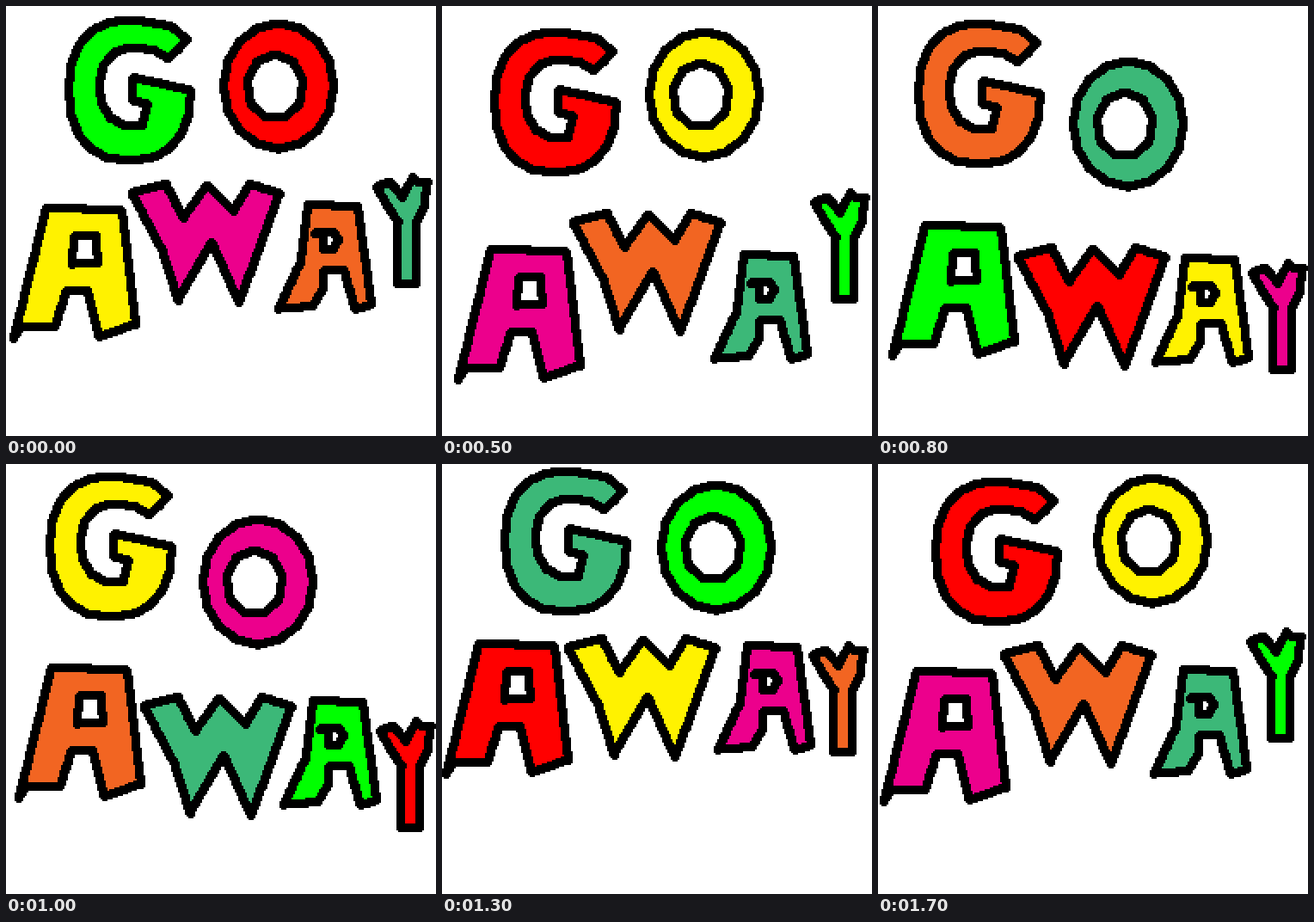
Write an HTML page with a canvas that moves like this. It is 500 px wide and 500 px high and loops after 1800 ms.

```html
<!DOCTYPE html>
<html lang="en">
<head>
<meta charset="utf-8">
<title>Go away</title>
<style>
html, body { margin: 0; width: 100%; height: 100%; overflow: hidden; background: #fff; }
canvas { display: block; width: 500px; height: 500px; image-rendering: pixelated; }
</style>
</head>
<body>
<canvas id="stage" width="250" height="250" role="img" aria-label="GO AWAY"></canvas>
<script>
const ctx = document.getElementById('stage').getContext('2d');
const STEP = 100, STEPS = 18;
const KEYS = [0, 3, 9, 13, 16, STEPS];
const COLORS = ['#00ff00', '#3cb878', '#f26522', '#ec008c', '#fff200', '#ff0000'];

// "x,y x,y ..." in stage pixels
const line = s => s.split(' ').map(p => p.split(',').map(Number));

// points along an ellipse, angles in degrees; square < 1 gives fuller corners
function arc(cx, cy, rx, ry, from, to, n, square = 1) {
  const bend = v => Math.sign(v) * Math.abs(v) ** square;
  return Array.from({ length: n + 1 }, (_, i) => {
    const a = (from + (to - from) * i / n) * Math.PI / 180;
    return [cx + rx * bend(Math.cos(a)), cy + ry * bend(Math.sin(a))];
  });
}
const ring = (cx, cy, rx, ry, n) => arc(cx, cy, rx, ry, -90, 270, n);

// every letter starts and ends at rest and passes through its poses at the keys
const letter = (poses, ...loops) => ({ poses: line(`0,0 ${poses} 0,0`), loops });

const letters = [
  letter('-2,20 -30,0 0,-8 -12,8', [
    ...line('210,38 190,22'),
    ...arc(143, 97, 71, 82, 290, 0, 16, 0.85),
    ...line('147,82 145,108 164,113 157,138'),
    ...arc(143, 93, 36, 46, 100, 270, 6),
    ...line('170,50 188,60')
  ]),
  letter('-2,-14 -32,56 2,4 4,-8',
    ring(316, 92, 64, 73, 16),
    ring(312, 93, 33, 38, 9)),
  letter('10,68 8,10 -4,-26 -4,13',
    line('46,233 134,237 150,369 107,384 94,330 70,329 56,371 16,372 8,386'),
    line('79,267 103,265 106,298 75,299')),
  letter('0,6 18,87 0,-4 0,6',
    line('145,216 185,206 205,245 233,207 263,237 282,206 317,217 296,274 270,344 238,273 199,341 181,284')),
  letter('-4,56 7,64 3,-20 8,16',
    line('350,230 408,232 424,346 405,352 392,306 369,307 367,328 355,348 316,351 342,296'),
    line('358,263 378,261 386,270 380,281 368,282 368,264')),
  letter('0,-36 4,128 0,12 4,-8',
    line('430,209 445,203 460,221 472,198 478,204 489,203 485,232 476,252 475,322 454,322 455,250 442,231'))
];

function offset(poses, k) {
  const i = KEYS.findIndex(key => key > k) - 1;
  const t = (k - KEYS[i]) / (KEYS[i + 1] - KEYS[i]);
  return poses[i].map((v, axis) => Math.round((v + (poses[i + 1][axis] - v) * t) / 2));
}

// hard-edged round brush
function dab(x, y) {
  ctx.fillRect(x - 2, y - 1, 5, 3);
  ctx.fillRect(x - 1, y - 2, 3, 5);
}

function outline(loop) {
  loop.forEach(([x, y], i) => {
    const [x2, y2] = loop[(i + 1) % loop.length];
    const n = Math.ceil(Math.hypot(x2 - x, y2 - y) / 2);
    for (let j = 0; j < n; j++) {
      dab(Math.round((x + (x2 - x) * j / n) / 2), Math.round((y + (y2 - y) * j / n) / 2));
    }
  });
}

function drawLetter({ poses, loops }, color, k) {
  ctx.setTransform(1, 0, 0, 1, ...offset(poses, k));
  const shape = new Path2D();
  for (const loop of loops) {
    loop.forEach(([x, y], i) => shape[i ? 'lineTo' : 'moveTo'](x / 2, y / 2));
    shape.closePath();
  }
  ctx.fillStyle = color;
  ctx.fill(shape, 'evenodd');
  ctx.fillStyle = '#000';
  loops.forEach(outline);
}

function draw(k) {
  ctx.setTransform(1, 0, 0, 1, 0, 0);
  ctx.fillStyle = '#fff';
  ctx.fillRect(0, 0, 250, 250);
  const n = COLORS.length;
  letters.forEach((l, i) => drawLetter(l, COLORS[(k - i + n) % n], k));
}

let shown = -1;
function tick() {
  const k = Math.floor(performance.now() / STEP) % STEPS;
  if (k !== shown) draw(shown = k);
  requestAnimationFrame(tick);
}
tick();
</script>
</body>
</html>
```
